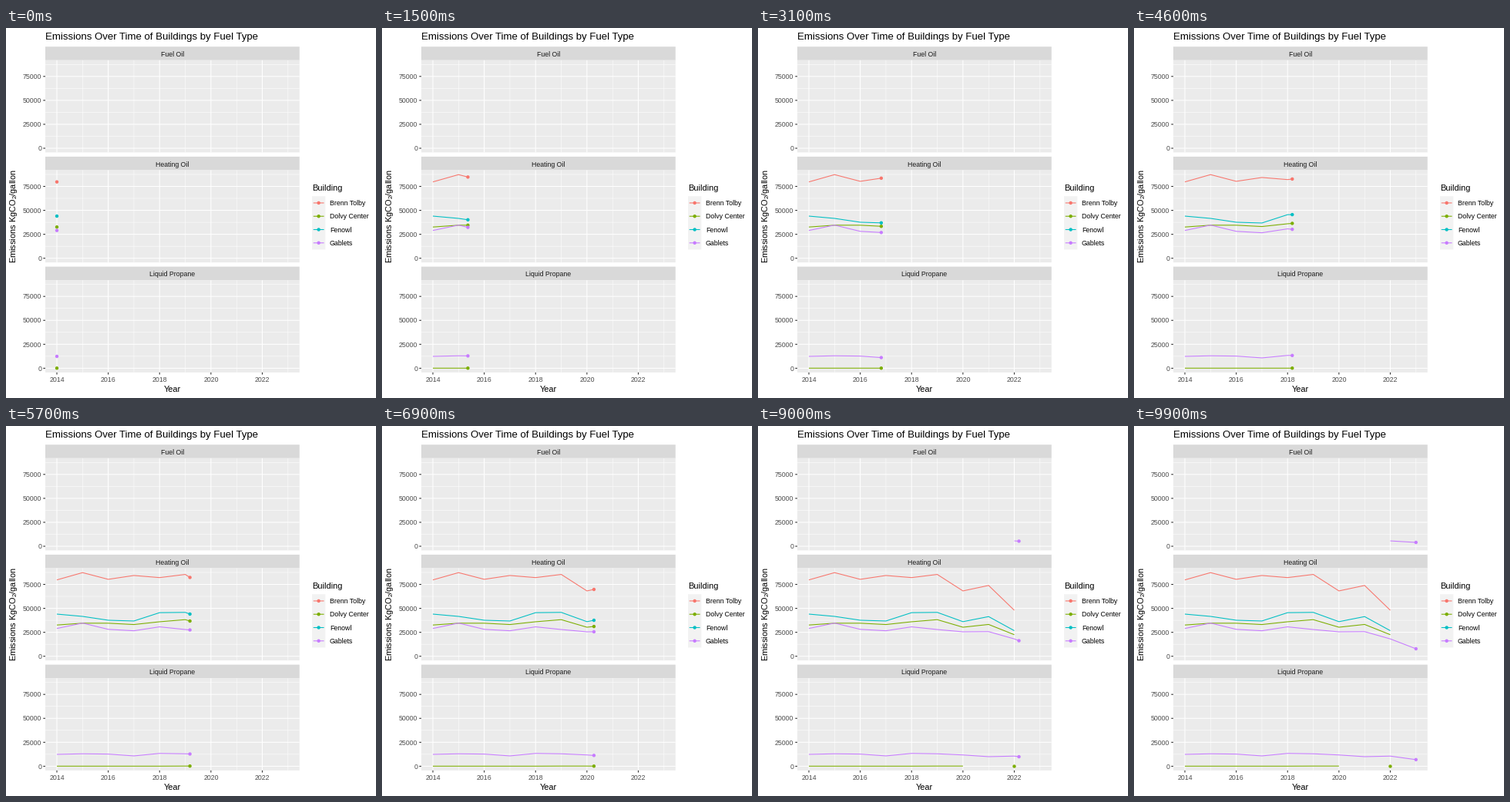
Recreate the animation shown at these times as a matplotlib script. Size 480x480 px, loop 10000 ms.

```python
import matplotlib.pyplot as plt
from matplotlib.animation import FuncAnimation
from matplotlib.patches import Rectangle

plt.rcParams.update({
    "font.family": "Liberation Sans",
    "mathtext.fontset": "custom",
    "mathtext.rm": "Liberation Sans",
    "path.snap": False,
})

SIZE, DPI = 480, 72
STEPS, FRAMES, INTERVAL = 11, 100, 100      # steps per year
X0, DX = 66.0, 33.31                        # 2014 and one year, in px
LEFT, RIGHT = X0 - 0.45 * DX, X0 + 9.45 * DX
PX = 31.07 / 25                             # px per 1000 kg
HEIGHT, STRIP = 119.6, 17.6
ZERO = {"Fuel Oil": 156.0, "Heating Oil": 298.7, "Liquid Propane": 441.4}
RED, GREEN, TEAL, PURPLE = "#F8766D", "#7CAE00", "#00BFC4", "#C77CFF"
BUILDINGS = {"Brenn Tolby": RED, "Dolvy Center": GREEN,
             "Fenowl": TEAL, "Gablets": PURPLE}
LINE = 1.07
DOT = 4.4 ** 2

# panel, colour, first year since 2014, thousands of kg per year
SERIES = [
    ("Fuel Oil", RED, 8, [29.3]),
    ("Fuel Oil", PURPLE, 8, [5.6, 4.0]),
    ("Heating Oil", RED, 0,
     [79.7, 87.3, 80.3, 84.3, 82.1, 85.4, 68.2, 73.9, 48.0]),
    ("Heating Oil", GREEN, 0,
     [32.6, 34.5, 34.5, 33.1, 36.0, 38.2, 30.3, 33.2, 22.5]),
    ("Heating Oil", TEAL, 0,
     [44.0, 41.6, 37.6, 36.8, 45.5, 45.8, 36.1, 41.4, 26.7]),
    ("Heating Oil", PURPLE, 0,
     [29.0, 34.6, 28.1, 26.6, 30.7, 27.9, 25.5, 25.7, 18.1, 7.8]),
    ("Liquid Propane", GREEN, 0, [0.1] * 5 + [0.2, 0.2, -0.1, -0.1]),
    ("Liquid Propane", PURPLE, 0,
     [12.4, 13.0, 12.7, 10.8, 13.4, 13.0, 11.8, 10.0, 10.6, 6.9]),
]
GAP_PANEL, GAP_COLOR, GAP_START, GAP_END = "Liquid Propane", GREEN, 6, 8

fig = plt.figure(figsize=(SIZE / DPI, SIZE / DPI), dpi=DPI, facecolor="white")
ax = fig.add_axes([0, 0, 1, 1])
ax.set(xlim=(0, SIZE), ylim=(SIZE, 0))
ax.axis("off")


def px(year):
    return X0 + DX * year


def py(panel, value):
    return ZERO[panel] - PX * value


def rect(x, y, w, h, color):
    ax.add_patch(Rectangle((x, y), w, h, fc=color, ec="none", zorder=0))


def rule(xs, ys, color="white", width=LINE, z=1):
    return ax.plot(xs, ys, color=color, lw=width, zorder=z,
                   solid_capstyle="butt", solid_joinstyle="round")[0]


def label(x, y, text, size=8.8, color="black", ha="center", **kw):
    ax.text(x, y, text, fontsize=size, color=color, ha=ha, va="baseline", **kw)


def draw_panel(name):
    bottom = ZERO[name] + 5.4
    top = bottom - HEIGHT
    rect(LEFT, top - STRIP, RIGHT - LEFT, STRIP, "#D9D9D9")
    rect(LEFT, top, RIGHT - LEFT, HEIGHT, "#EBEBEB")
    label((LEFT + RIGHT) / 2, top - 4.8, name, color="#1A1A1A")
    for v in (12.5, 37.5, 62.5, 87.5):
        rule([LEFT, RIGHT], [py(name, v)] * 2, width=LINE / 2)
    for year in (1, 3, 5, 7, 9):
        rule([px(year)] * 2, [top, bottom], width=LINE / 2)
    for v in (0, 25, 50, 75):
        y = py(name, v)
        rule([LEFT, RIGHT], [y, y])
        rule([LEFT - 2.75, LEFT], [y, y], "#333333")
        label(LEFT - 4.95, y + 3.2, str(v * 1000), color="#4D4D4D", ha="right")
    for year in range(0, 9, 2):
        rule([px(year)] * 2, [top, bottom])
    return bottom


def draw_legend():
    key, x, y = 17.28, 397.0, 218.3
    label(x, 211.3, "Building", size=11, ha="left")
    rect(x, y, key, key * len(BUILDINGS), "#F2F2F2")
    mids = [y + key * (i + 0.5) for i in range(len(BUILDINGS))]
    for (name, color), mid in zip(BUILDINGS.items(), mids):
        rule([x + key * 0.1, x + key * 0.9], [mid, mid], color, z=3)
        label(x + key + 5.5, mid + 3.2, name, ha="left")
    ax.scatter([x + key / 2] * len(mids), mids, s=DOT, lw=0,
               c=list(BUILDINGS.values()), zorder=4)


for panel in ZERO:
    base = draw_panel(panel)
for year in range(0, 9, 2):
    rule([px(year)] * 2, [base, base + 2.75], "#333333")
    label(px(year), 459.2, str(2014 + year), color="#4D4D4D")
label(LEFT, 15, "Emissions Over Time of Buildings by Fuel Type",
      size=13.2, ha="left")
label((LEFT + RIGHT) / 2, 472, "Year", size=11)
label(13, 244.7, r"Emissions KgCO$_\mathrm{2}$/gallon", size=11,
      rotation=90, rotation_mode="anchor")
draw_legend()

lines = [rule([], [], color, z=3) for _, color, _, _ in SERIES]
dots = ax.scatter([], [], s=DOT, lw=0, zorder=4)


def reveal(start, values, t):
    """Path up to time t, and its head while the series is still running."""
    path = [(start + i, v) for i, v in enumerate(values) if start + i <= t]
    last = start + len(values) - 1
    if not path or t > last:
        return path, None
    i = len(path) - 1
    if t > path[-1][0]:
        f = t - path[-1][0]
        path.append((t, values[i] + f * (values[i + 1] - values[i])))
    return path, path[-1]


def update(frame):
    t = frame / STEPS
    spots, colors = [], []
    for line, (panel, color, start, values) in zip(lines, SERIES):
        path, head = reveal(start, values, t)
        # this series loses its last stretch but keeps its end point
        if (panel, color) == (GAP_PANEL, GAP_COLOR) and t >= GAP_END:
            head = path[-1]
            path = path[:GAP_START + 1]
        line.set_data([px(x) for x, _ in path], [py(panel, v) for _, v in path])
        if head:
            spots.append((px(head[0]), py(panel, head[1])))
            colors.append(color)
    dots.set_offsets(spots)
    dots.set_facecolors(colors)
    return [*lines, dots]


anim = FuncAnimation(fig, update, frames=FRAMES, interval=INTERVAL,
                     repeat=True, repeat_delay=0, blit=False)
plt.show()
```
